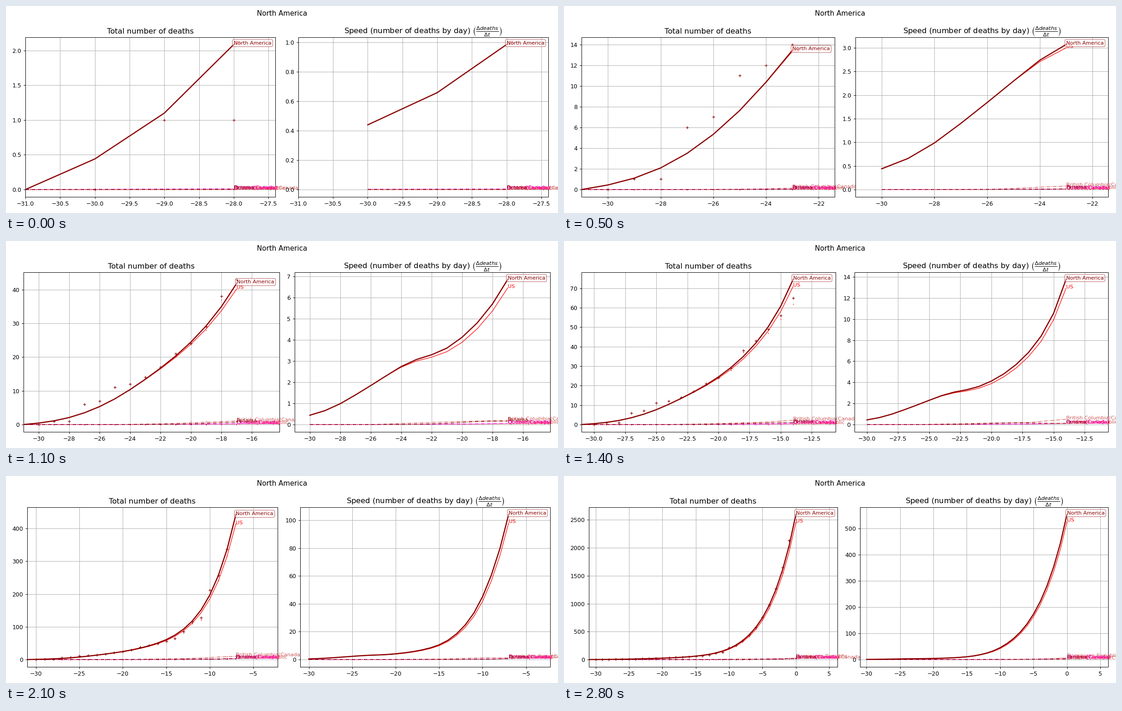
These frames come from a looping animation (1197x450 px, 5.8 s). A matplotlib script:

```python
import numpy as np
import matplotlib.pyplot as plt
from matplotlib.animation import FuncAnimation

W, H, DPI = 1197, 450, 90
EM = 10 * DPI / 72           # tick label size in px
PAD = 1.08 * EM
TICK = 7 * DPI / 72          # tick length plus label pad
SIDE = 2.5 * DPI / 72        # least room right of an axes
TOP, BOTTOM = 67.85, 414.75
FIRST, STEPS, HOLD = -28, 29, 29

days = np.arange(-31, 1)


def ramp(*knots):
    x, y = zip(*knots)
    return np.interp(days, x, y)


def growth(end, rate):
    return end * np.exp(rate * days)


def hump(peak, day, spread):
    return peak * np.exp(-((days - day) / spread) ** 2 / 2)


def smooth(values, step):
    """Cubic Hermite curve through evenly spaced values, sampled daily."""
    p = np.array(values)
    m = np.gradient(p)
    x = np.arange((len(p) - 1) * step + 1) / step
    i = np.minimum(x.astype(int), len(p) - 2)
    s = x - i
    ease = s * s * (3 - 2 * s)
    return (p[i] * (1 - ease) + p[i + 1] * ease
            + s * (1 - s) * (m[i] * (1 - s) - m[i + 1] * s))


# Deaths a day at every third day, joined on a log scale
key_speeds = [.44, 1.4, 2.74, 3.61, 5.7, 10.55, 24.8, 60.5, 135, 280, 553]
total = np.append(0, np.exp(smooth(np.log(key_speeds), 3)))
outside_us = ramp((-25, 0), (-20, .058), (-15, .058), (-10, .074), (-7, .059), (0, .05))

# Reported counts relative to the smoothed curve
scatter = ramp((-30, 0), (-29, .9), (-28, .5), (-27, 1.7), (-26, 1.35), (-25, 1.42),
               (-24, 1.15), (-23, 1.04), (-19, .98), (-18, 1.09), (-14, .87),
               (-12, .98), (-11, .85), (-10, 1.08), (-9, 1), (-3, 1.015),
               (-1, 1.045), (0, 1))

# name, colour, line style, width, daily speed
series = [
    ("Dominican Republic", "indianred", ":", 1, growth(9.5, .33)),
    ("British Columbia(Canada)", "indianred", "-.", 1,
     ramp((-26, 0), (-20, .15), (-17, .2), (-14, .5), (-10, 1.3), (-7, 1.2), (0, .7))),
    ("Quebec(Canada)", "red", ":", 1, growth(5, .28)),
    ("Ontario(Canada)", "magenta", "-.", 1, growth(4, .25)),
    ("Panama", "darkred", "-.", 1, growth(4.2, .28) + hump(.13, -18, 2.2)),
    ("US", "red", "-", 1, total * (1 - outside_us)),
    ("North America", "darkred", "-", 2, total),
]

fig = plt.figure(figsize=(W / DPI, H / DPI), dpi=DPI)
fig.suptitle("North America", fontsize=12)
axes = [fig.add_subplot(1, 2, i) for i in (1, 2)]
titles = [
    "Total number of deaths",
    r"Speed (number of deaths by day) $\left(\frac{\Delta deaths}{\Delta t}\right)$",
]


def text_width(s):
    return EM * sum({".": .318, "\u2212": .838}.get(c, .636) for c in s)


def visible(axis):
    lo, hi = axis.get_view_interval()
    ticks = [t for t in axis.get_majorticklocs() if lo <= t <= hi]
    return ticks, axis.get_major_formatter().format_ticks(ticks)


def label_space(ax):
    return PAD + TICK + max(map(text_width, visible(ax.yaxis)[1]))


def overhang(ax):
    """Room the last x label needs right of a default-width axes."""
    lo, hi = ax.get_xlim()
    ticks, labels = visible(ax.xaxis)
    inside = (hi - ticks[-1]) / (hi - lo) * .775 * W / 2.2
    return max(SIDE, text_width(labels[-1]) / 2 - inside)


def arrange():
    a, b = axes
    left = label_space(a)
    gap = label_space(b) + overhang(a)
    right = W - PAD - overhang(b)
    width = (right - left - gap) / 2
    for ax, x in ((a, left), (b, left + width + gap)):
        ax.set_position([x / W, 1 - BOTTOM / H, width / W, (BOTTOM - TOP) / H])


def draw_panel(ax, title, n, cumulative):
    ax.clear()
    last = days[n - 1]
    peak = 0
    for name, color, style, lw, speed in series:
        main = name == "North America"
        y = np.cumsum(speed) if cumulative else speed
        start = 0 if cumulative else 1
        ax.plot(days[start:n], y[start:n], color=color, ls=style, lw=lw)
        peak = max(peak, y[:n].max())
        if cumulative:
            count = np.round(y * scatter)
            ax.plot(days[1:n], count[1:n], "+", color=color,
                    ms=5 if main else 2, mew=1 if main else .75)
            peak = max(peak, count[:n].max())
        box = dict(boxstyle="round,pad=0.25", fc="white", ec=color, alpha=.5)
        ax.text(last, y[n - 1], name, color=color, fontsize=9,
                bbox=box if main else None)
    ax.set_xlim(-31, last + .2 * (last + 31))
    ax.set_ylim(-.05 * peak, 1.05 * peak)
    ax.set_title(title, fontsize=13)
    ax.grid(True)


def update(i):
    n = FIRST + min(i, STEPS - 1) + 32
    for ax, title, cumulative in zip(axes, titles, (True, False)):
        draw_panel(ax, title, n, cumulative)
    arrange()
    return axes


anim = FuncAnimation(fig, update, frames=STEPS + HOLD, interval=100,
                     init_func=lambda: axes, repeat=True, repeat_delay=0)
plt.show()
```
